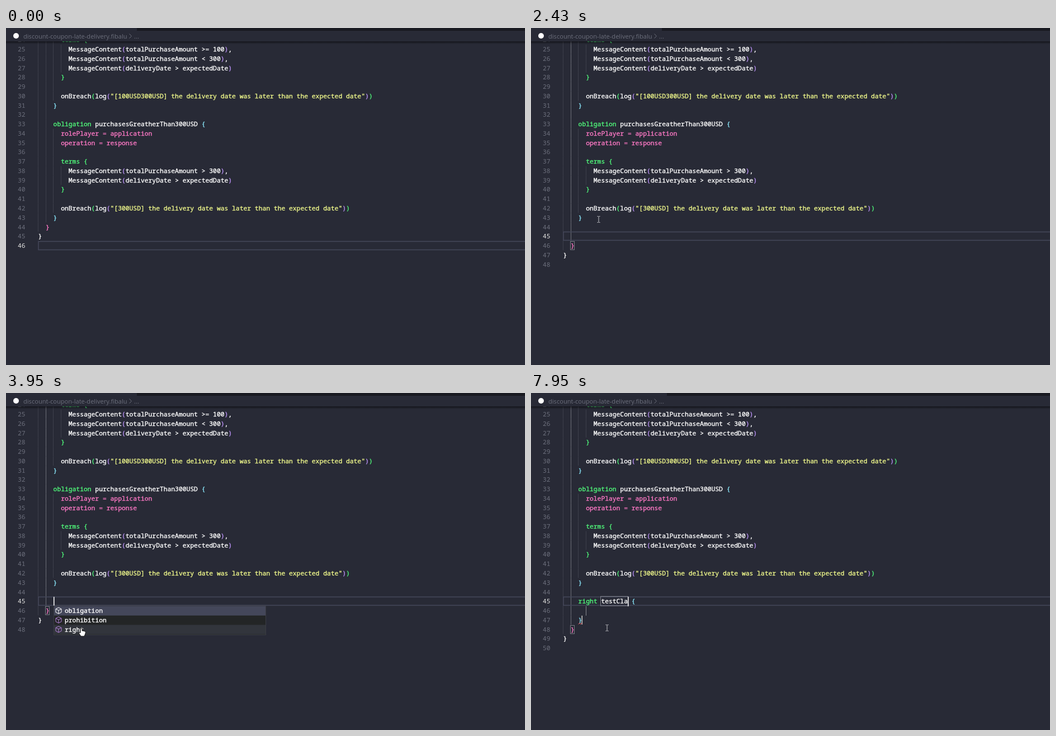
These frames come from a looping animation (928 px wide and 604 px high, 8 s). An HTML page with a canvas:

```html
<!DOCTYPE html>
<html lang="en">
<head>
<meta charset="utf-8">
<title>Code editor</title>
<style>
  html, body { margin: 0; height: 100%; overflow: hidden; background: #282a36; }
  canvas { display: block; }
</style>
</head>
<body>
<canvas id="stage" width="928" height="604"></canvas>
<script>
const ctx = document.getElementById('stage').getContext('2d');
const LOOP = 8000, FIRST = 24, LEFT = 57.4, CHAR = 6.798, ROW = 16.765;
const MONO = '11.33px "Noto Sans Mono", "DejaVu Sans Mono", monospace';
const SANS = '11.1px "Open Sans", "Noto Sans", sans-serif';
const BG = '#282a36', WHITE = '#fff', GREEN = '#50fa7b', PINK = '#ff79c6',
  YELLOW = '#f1fa8c', CYAN = '#8be9fd', PURPLE = '#bd93f9', DIM = '#6c6f7c', LINE = '#44475a';
const BRACKETS = [WHITE, PINK, CYAN, GREEN, PURPLE];

const head = `      terms {
        MessageContent(totalPurchaseAmount >= 100),
        MessageContent(totalPurchaseAmount < 300),
        MessageContent(deliveryDate > expectedDate)
      }

      onBreach(log("[100USD300USD] the delivery date was later than the expected date"))
    }

    obligation purchasesGreatherThan300USD {
      rolePlayer = application
      operation = response

      terms {
        MessageContent(totalPurchaseAmount > 300),
        MessageContent(deliveryDate > expectedDate)
      }

      onBreach(log("[300USD] the delivery date was later than the expected date"))
    }`.split('\n');
const tail = ['  }', '}', ''];

const CLICK = 1110, ENTER1 = 1780, ENTER2 = 1900, POPUP = 2490, INSERT = 4020, ERASE = 5420;
const keyTimes = [6680, 6770, 6870, 7010, 7490, 7820, 7950];
const caretOff = [[1640, 1780], [2430, 2910], [3410, 3900], [4490, 5020], [5950, 6410]];
const mousePath = [
  [70, 628, 511], [220, 520, 474], [400, 350, 416], [600, 205, 367], [850, 139, 346],
  [1050, 123, 343], [1250, 121, 343], [3250, 121, 343], [3320, 135, 399],
  [3600, 135, 409], [3900, 135, 421], [4020, 136, 421]
];

const within = (t, a, b) => t >= a && t < b;
const colX = col => LEFT + col * CHAR;
const midY = n => 38 + (n - 25) * ROW;
const indentOf = s => s.search(/\S/);

function rect(x, y, w, h, color) {
  ctx.fillStyle = color;
  ctx.fillRect(x, y, w, h);
}

function text(s, x, y, color, font = MONO, align = 'left') {
  ctx.font = font;
  ctx.textAlign = align;
  ctx.fillStyle = color;
  ctx.fillText(s, x, Math.round(y));
}

// Code is a little heavier than the regular weight.
function codeText(s, x, y, color) {
  text(s, x, y, color);
  ctx.strokeStyle = color;
  ctx.lineWidth = .35;
  ctx.strokeText(s, x, Math.round(y));
}

function outline(x, y, w, h, color, width = 1) {
  ctx.strokeStyle = color;
  ctx.lineWidth = width;
  ctx.strokeRect(x, y, w, h);
}

function path(d, stroke, fill, width = 1) {
  const p = new Path2D(d);
  if (fill) { ctx.fillStyle = fill; ctx.fill(p); }
  ctx.strokeStyle = stroke;
  ctx.lineWidth = width;
  ctx.stroke(p);
}

function clauseName(t) {
  if (t < ERASE) return 'clauseName';
  return 'testCla'.slice(0, keyTimes.filter(k => t >= k).length);
}

function linesAt(t) {
  if (t < ENTER1) return [...head, ...tail];
  if (t < ENTER2) return [...head, '', ...tail];
  if (t < INSERT) return [...head, '', '', ...tail];
  return [...head, '', `    right ${clauseName(t)} {`, '', '    }', ...tail];
}

function drawCode(s, n) {
  let depth = indentOf(s) / 2;
  const assign = s.includes(' = ');
  if (s.trim()[0] === '}') depth++;
  for (const m of s.matchAll(/"[^"]*"|[(){}]|\w+|[^\s\w(){}"]+/g)) {
    const word = m[0];
    let color = assign ? PINK : WHITE;
    if (word[0] === '"') color = YELLOW;
    else if (/^(terms|obligation|right)$/.test(word)) color = GREEN;
    else if ('({'.includes(word)) color = BRACKETS[depth++];
    else if (')}'.includes(word)) color = BRACKETS[--depth];
    codeText(word, colX(m.index), midY(n) + 4, color);
  }
}

function drawGuides(lines, active) {
  // A blank line takes the deeper indent of its neighbours.
  const near = (i, step) => {
    while (lines[i] === '') i += step;
    return i in lines ? indentOf(lines[i]) : 0;
  };
  lines.forEach((s, i) => {
    const n = FIRST + i;
    const last = i === lines.length - 1;
    const depth = s ? indentOf(s) : last ? 0 : Math.max(near(i, -1), near(i, 1));
    for (let c = 0; c < depth; c += 2) {
      const lit = active && c === active[0] && within(n, active[1], active[2]);
      rect(Math.floor(colX(c) + .1), midY(n) - ROW / 2, 1, ROW, lit ? '#6d6f79' : '#3d3f4b');
    }
  });
}

function mouseAt(t) {
  if (t < mousePath[0][0]) return null;
  const i = mousePath.findIndex(p => p[0] > t);
  if (i < 0) return mousePath.at(-1).slice(1);
  const [a, x, y] = mousePath[i - 1], [b, x2, y2] = mousePath[i];
  const k = (t - a) / (b - a);
  return [x + (x2 - x) * k, y + (y2 - y) * k];
}

function drawMouse([x, y], hand) {
  ctx.save();
  ctx.translate(Math.round(x), Math.round(y));
  if (hand) {
    path('M-2 1Q0-1 1 1V5L6 6Q8 7 7 10L5 15H-1L-5 9Q-4 7-2 9Z', '#111', '#fff');
  } else {
    path('M-2.5-5.5H-.5M.5-5.5H2.5M0-5V5M-2.5 5.5H-.5M.5 5.5H2.5', '#c4c5c9');
  }
  ctx.restore();
}

function drawPopup(t, mouse) {
  rect(85, 382, 380, 52, '#232526');
  outline(85.5, 381.5, 379, 52, '#3a3c43');
  const hover = t > 3385 ? Math.floor((mouse[1] - 382) / ROW) : 0;
  ['obligation', 'prohibition', 'right'].forEach((s, i) => {
    const y = midY(46 + i);
    if (i === 0) rect(86, y - 8, 378, ROW, LINE);
    else if (i === hover) rect(86, y - 8, 378, ROW, '#32353c');
    ctx.save();
    ctx.translate(94, y);
    path('M0-5.5L5-3V3L0 5.5L-5 3V-3ZM-5-3L0-.5L5-3M0-.5V5.5', i ? '#b180d7' : '#fff');
    ctx.restore();
    codeText(s, 105, y + 4, WHITE);
  });
}

function drawHeader(t) {
  rect(0, 0, 928, 24, BG);
  const tab = t < 4090 ? 234 : within(t, 5550, 6770) ? 245 : 243;
  rect(tab, 0, 928 - tab, 5, '#191a21');
  const shade = ctx.createLinearGradient(0, 24, 0, 29);
  shade.addColorStop(0, 'rgba(0,0,0,.5)');
  shade.addColorStop(1, 'rgba(0,0,0,0)');
  rect(0, 24, 928, 5, shade);
  ctx.beginPath();
  ctx.arc(18, 14, 5, 0, Math.PI * 2);
  ctx.fillStyle = WHITE;
  ctx.fill();
  text('discount-coupon-late-delivery.fibalu', 31, 19, DIM, SANS);
  path('M220.5 10.5L224.5 14.5L220.5 18.5', DIM);
  text('...', 229, 19, DIM, SANS);
}

function drawSnippet(t, name) {
  if (name) outline(124.5, 364.5, name.length * CHAR + 1.5, 17, '#7d7f88');
  rect(98, 382, 1, 17, '#85878e');
  rect(90.5, 399, 1.5, 16, '#c9cbc8');
  if (t >= 4160) path('M84.5 414.5l2-2l2 2l2-2l1 1', '#ff5555');
}

function draw(t) {
  const lines = linesAt(t), name = clauseName(t), mouse = mouseAt(t);
  const inserted = t >= INSERT;
  const current = t < CLICK ? 46 : t < ENTER1 ? 43 : t < ENTER2 ? 44 : 45;
  const active = t < CLICK ? null : t < ENTER1 ? [4, 34, 43] : [2, 24, 48];
  rect(0, 0, 928, 604, BG);

  drawGuides(lines, active);
  if (!within(t, INSERT, ERASE)) {
    outline(58, Math.round(midY(current) - 8) + .5, 880, 15, LINE, 1.5);
  }

  const matched = within(t, CLICK, ENTER1) ? [[33, 43], [43, 4]]
    : within(t, ENTER2, INSERT) ? [[46, 2]] : t >= ERASE ? [[48, 2]] : [];
  for (const [n, col] of matched) {
    outline(Math.round(colX(col)) - .5, Math.round(midY(n)) - 7.5, 7, 15, '#777b82');
  }

  lines.forEach((s, i) => {
    const n = FIRST + i;
    drawCode(s, n);
    text(n, 34.5, midY(n) + 4, n === current ? '#e4e4e2' : DIM, MONO, 'right');
  });

  if (inserted) drawSnippet(t, name);
  if (t >= CLICK && !caretOff.some(([a, b]) => within(t, a, b))) {
    const col = inserted ? 10 + name.length : current === 43 ? 5 : 4;
    rect(Math.round(colX(col)), midY(current) - 8, 1.5, 17, WHITE);
  }

  drawHeader(t);
  if (within(t, POPUP, INSERT)) drawPopup(t, mouse);
  if (mouse) drawMouse(mouse, within(t, 3300, INSERT));
}

function frame() {
  draw(performance.now() % LOOP);
  requestAnimationFrame(frame);
}
frame();
</script>
</body>
</html>
```
